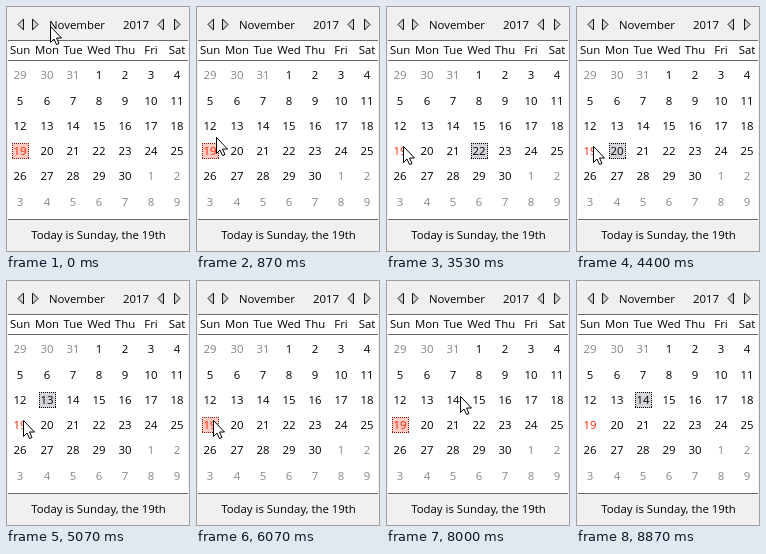
An HTML page with a canvas for the animation above (9670 ms loop, 184 px wide and 246 px high).

```html
<!DOCTYPE html>
<html lang="en">
<head>
<meta charset="utf-8">
<title>Calendar</title>
<style>
  html, body { margin: 0; width: 100%; height: 100%; overflow: hidden; background: #f0f0f0; }
  canvas { display: block; width: 184px; height: 246px; }
</style>
</head>
<body>
<canvas id="stage" width="184" height="246"></canvas>
<script>
const ctx = document.getElementById('stage').getContext('2d');
const LOOP = 9670;
const TODAY = 19;
const FIRST_CELL = -2; // the grid opens on 29 October
const WEEKDAYS = ['Sun', 'Mon', 'Tue', 'Wed', 'Thu', 'Fri', 'Sat'];

// Arrow keys pressed in turn, then a click; one tick is 1/15 s
const KEYS = 'RRRLLUUDDL';
const KEY_STEP = { L: -1, R: 1, U: -7, D: 7 };
const CLICK = { tick: 124, day: 14 };

// The pointer rests between glides
const POINTER_START = { x: 44, y: 20 };
const GLIDES = [
  { from: 3, to: 17, x: 18, y: 141 },
  { from: 18, to: 21, x: 17, y: 140 },
  { from: 112, to: 113, x: 35, y: 140 },
  { from: 113, to: 120, x: 74, y: 116 },
  { from: 130, to: 133, x: 40, y: 252 }
];

const cellX = col => Math.round(6.49 + 26.1 * col);
const cellY = row => Math.round(61.4 + 25.25 * row);
const easeOut = u => 1 - (1 - u) ** 2;

// The presses come a little faster each time
const keyTick = k => Math.round(38 + 7.89 * k - 0.222 * k * k);

function rect(x, y, w, h, color) {
  ctx.fillStyle = color;
  ctx.fillRect(x, y, w, h);
}

function text(str, x, y, color = '#000', align = 'center') {
  ctx.font = '11.4px "Open Sans", "Noto Sans", sans-serif';
  ctx.textAlign = align;
  ctx.fillStyle = color;
  ctx.fillText(str, x, y);
}

function polygon(points, fill, stroke) {
  ctx.beginPath();
  points.forEach(([x, y]) => ctx.lineTo(x, y));
  ctx.closePath();
  ctx.fillStyle = fill;
  ctx.fill();
  ctx.strokeStyle = stroke;
  ctx.lineWidth = 1;
  ctx.stroke();
}

function arrow(tipX, direction) {
  const baseX = tipX - direction * 5.5;
  polygon([[tipX, 18.5], [baseX, 13], [baseX, 24]], '#d4d4d4', '#111');
}

function focusBox(x, y, w, h, fill, dots) {
  rect(x, y, w, h, fill);
  for (let i = 0; i < w; i += 2) {
    rect(x + i, y, 1, 1, dots);
    rect(x + i, y + h - 1, 1, 1, dots);
  }
  for (let i = 0; i < h; i += 2) {
    rect(x, y + i, 1, 1, dots);
    rect(x + w - 1, y + i, 1, 1, dots);
  }
}

function drawFrame() {
  rect(0, 0, 184, 246, '#a0a0a0');
  rect(1, 1, 182, 244, '#f0f0f0');
  rect(2, 34, 180, 179, '#fff');
  for (const y of [34, 54, 213]) rect(2, y, 180, 1, '#696969');
  arrow(12, -1);
  arrow(32, 1);
  arrow(152, -1);
  arrow(174, 1);
  text('November', 43, 23, '#000', 'left');
  text('2017', 117, 23, '#000', 'left');
  text('Today is Sunday, the 19th', 92.5, 233);
}

function drawDays(selected) {
  WEEKDAYS.forEach((name, col) => text(name, cellX(col) + 8, 48));
  for (let i = 0; i < 42; i++) {
    const day = FIRST_CELL + i;
    const inMonth = day >= 1 && day <= 30;
    const label = String(day < 1 ? day + 31 : day > 30 ? day - 30 : day);
    const x = cellX(i % 7), y = cellY(Math.floor(i / 7));
    const isToday = day === TODAY;
    if (day === selected) {
      const w = 5 + 6 * label.length;
      focusBox(x + (17 - w) / 2, y, w, 16,
        isToday ? '#ffccc4' : '#d5d5d9', isToday ? '#8c1a10' : '#000');
    }
    text(label, x + 8, y + 12, isToday ? '#ff2000' : inMonth ? '#000' : '#868686');
  }
}

function selectedAt(tick) {
  if (tick >= CLICK.tick) return CLICK.day;
  return [...KEYS].reduce(
    (day, key, k) => tick >= keyTick(k) ? day + KEY_STEP[key] : day, TODAY);
}

function pointerAt(tick) {
  let { x, y } = POINTER_START;
  for (const glide of GLIDES) {
    const u = (tick - glide.from) / (glide.to - glide.from);
    const e = easeOut(Math.min(1, Math.max(0, u)));
    x += (glide.x - x) * e;
    y += (glide.y - y) * e;
  }
  return [Math.round(x), Math.round(y)];
}

function drawPointer([x, y]) {
  const shape = [[0, 0], [0, 16], [3.5, 12.5], [6, 18], [8.5, 17], [6, 11.5], [11, 11.5]];
  polygon(shape.map(([px, py]) => [x + px + 0.5, y + py + 0.5]), '#fff', '#000');
}

// Tick boundaries fall on rounded hundredths of a second
function tickAt(ms) {
  const tick = Math.floor((ms + 3.5) * 0.015);
  return Math.round(tick / 0.15) * 10 > ms ? tick - 1 : tick;
}

function render() {
  const tick = tickAt(performance.now() % LOOP);
  drawFrame();
  drawDays(selectedAt(tick));
  drawPointer(pointerAt(tick));
  requestAnimationFrame(render);
}

render();
</script>
</body>
</html>
```
